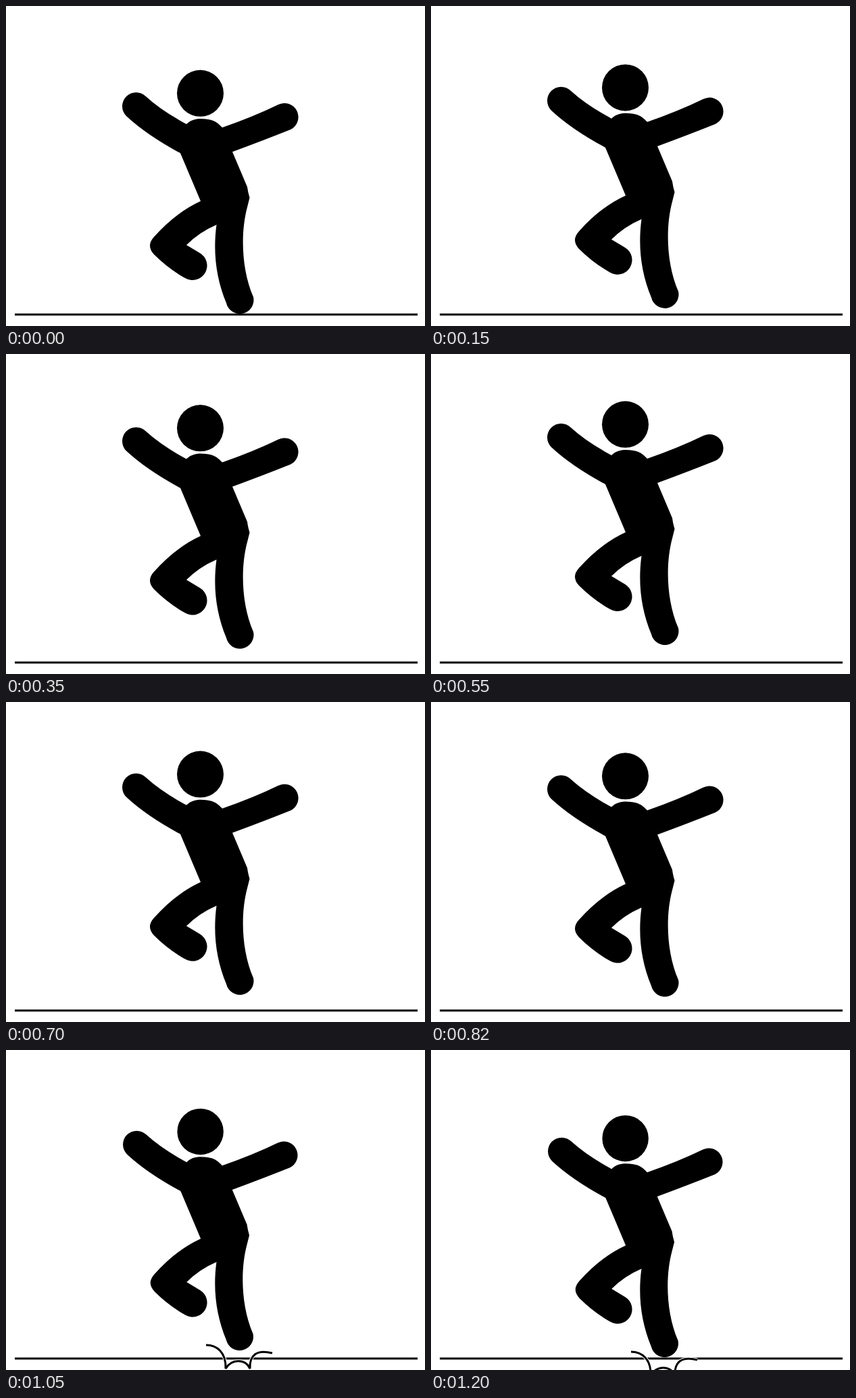
An HTML page that plays this animation: 620x474 px, repeating every 1250 ms.

```html
<!DOCTYPE html>
<html lang="en">
<head>
<meta charset="utf-8">
<title>Hopping figure</title>
<style>
  html, body { margin: 0; width: 100%; height: 100%; overflow: hidden; background: #fff; }
  svg { display: block; width: 620px; height: 474px; }
  .line { fill: none; stroke: #000; stroke-width: 3; }
  .halo { fill: none; stroke: #fff; stroke-width: 5; }
</style>
</head>
<body>
<svg viewBox="0 0 620 474">
  <defs>
    <path id="sparks" d="M296 447C312 447 326 458 325 482C334 467 354 467 361 482C360 462 371 453 394 459"/>
  </defs>
  <path class="line" d="M13 457H609"/>
  <g id="marks">
    <use href="#sparks" class="halo"/>
    <use href="#sparks" class="line"/>
  </g>
  <g id="figure">
    <circle cx="287.5" cy="129.3" r="34.5"/>
    <path d="M267 175C274 168 282 167 289 167C302 168 309 168 320 180
      Q366 164 403 146A20.5 20.5 0 0 1 421 183Q381 199 335 216
      L357 268Q358 276 360.5 284L357 298C347 335 348 390 366 431A20.5 20.5 0 0 1 326 440
      C311 404 306 365 311.5 324Q286 335 267 354
      L287 366A21.5 21.5 0 0 1 265 403Q240 389 219 368Q207 355 219 342Q251 306 288 289
      L258 218Q208 191 178 163A20.5 20.5 0 0 1 207 134Q230 155 267 175Z"/>
  </g>
</svg>
<script>
  const LOOP = 1250, TOP = 9, HEIGHT = 25, FALL = 10 / 3;
  // Start time of each held pose: nine steps up, nine steps down.
  const starts = [0, 50, 100, 150, 200, 250, 300, 350, 430, 550,
                  700, 820, 900, 950, 1000, 1050, 1100, 1150, 1200];
  const figure = document.getElementById('figure');
  const marks = document.getElementById('marks');

  function draw(now) {
    const t = now % LOOP;
    const step = starts.filter(s => s <= t).length - 1;
    const landing = step >= 14;
    const y = landing
      ? FALL * (step - 18)
      : -HEIGHT * (TOP - Math.abs(step - TOP)) / TOP;

    // The landing pose is slightly smaller and carries the impact marks.
    figure.setAttribute('transform', landing
      ? `translate(303 ${274.5 + y}) scale(.992) translate(-303 -274)`
      : `translate(0 ${y})`);
    marks.setAttribute('transform', `translate(0 ${y})`);
    marks.setAttribute('visibility', landing ? 'visible' : 'hidden');
  }

  const origin = performance.now();
  function tick() {
    draw(performance.now() - origin);
    requestAnimationFrame(tick);
  }
  tick();
</script>
</body>
</html>
```
